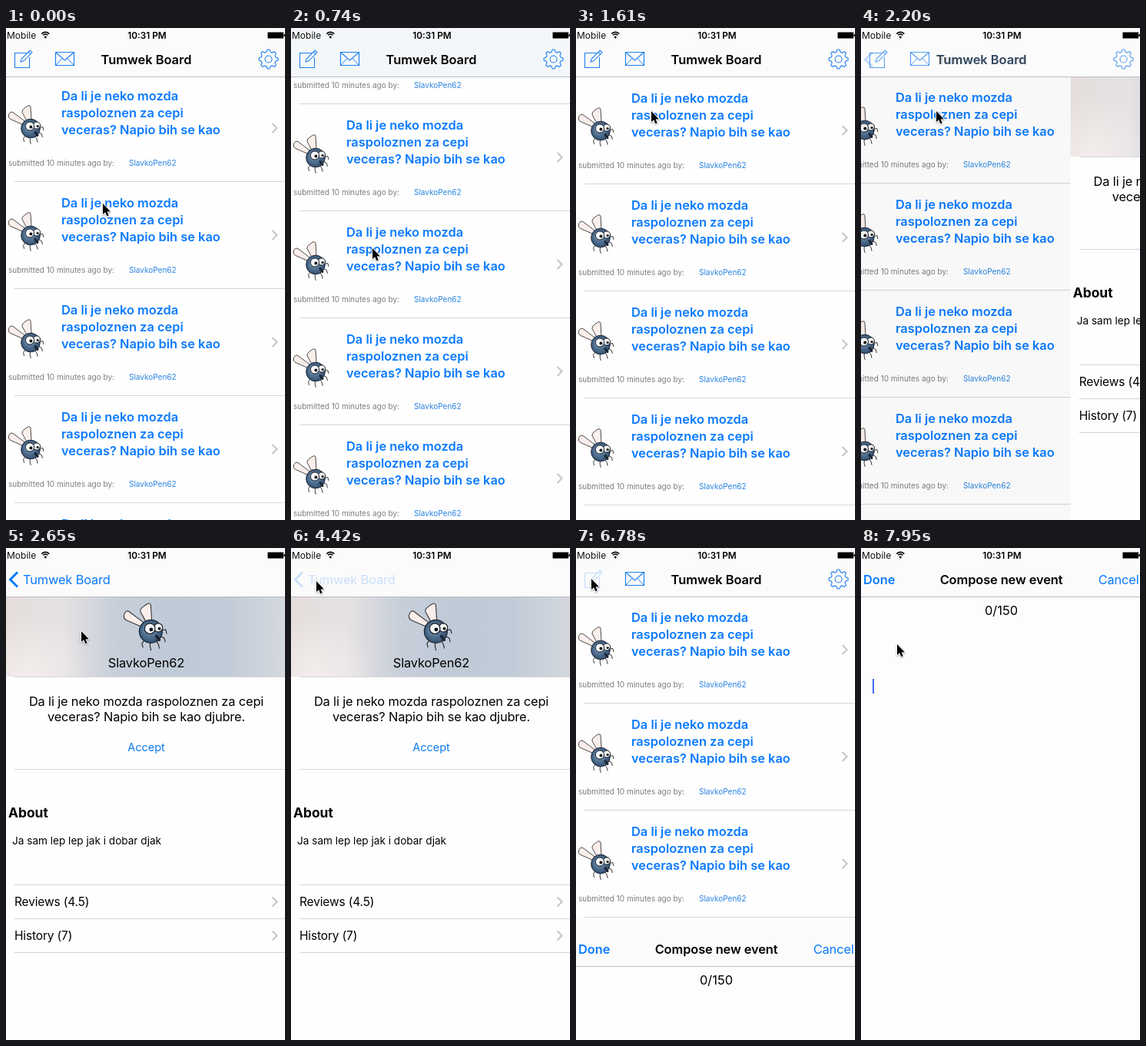
An HTML page with a canvas that plays this animation: 363x639 px, repeating every 8000 ms.

```html
<!DOCTYPE html>
<html lang="en">
<head>
<meta charset="utf-8">
<title>Board app</title>
<style>
  html, body { margin: 0; width: 100%; height: 100%; overflow: hidden; background: #fefefe; }
  canvas { display: block; width: 363px; height: 639px; }
</style>
</head>
<body>
<canvas id="stage"></canvas>
<script>
const W = 363, H = 639, MID = 182.5, LOOP = 8000, STEP = 147.2;
const NAV = 63.5, ROW = 139;
const BLUE = '#0a7aff', ICON = '#2080f0', PAPER = '#fefefe';
const APP = 'Tumwek Board', USER = 'SlavkoPen62';

const canvas = document.getElementById('stage');
const ctx = canvas.getContext('2d');
const dpr = window.devicePixelRatio || 1;
canvas.width = W * dpr;
canvas.height = H * dpr;

const clamp = u => Math.max(0, Math.min(1, u));
const smooth = u => u * u * (3 - 2 * u);
const easeOut = u => 1 - (1 - clamp(u)) ** 3;

// Pointer moves between rests, timed in screen steps
const MOVES = [
  { from: 0, to: 5, x: 106, y: 286 },
  { from: 5, to: 10, x: 98, y: 108 },
  { from: 21, to: 25, x: 62, y: 345 },
  { from: 25, to: 29, x: 33, y: 43 },
  { from: 31, to: 34, x: 36, y: 88 },
  { from: 34, to: 37, x: 33, y: 80 },
  { from: 38, to: 44, x: 20, y: 40 },
  { from: 46, to: 50, x: 47, y: 125 }
];

function pointerAt(n) {
  let x = 126, y = 228;
  for (const m of MOVES) {
    const u = smooth(clamp((n - m.from) / (m.to - m.from)));
    x += (m.x - x) * u;
    y += (m.y - y) * u;
  }
  return [x, y];
}

// A flick up and back past the top, then a decaying bounce
function scrollAt(n) {
  return n <= 8
    ? 119 * Math.sin(Math.PI * n / 8) - 1.75 * n
    : -2 - 12 * Math.exp(-(n - 8) * 0.7);
}

function text(s, x, y, size = 16.4, opt = {}) {
  const { weight = 400, color = '#000', align = 'left', spacing = 0 } = opt;
  ctx.font = `${weight} ${size}px Inter, "Liberation Sans", sans-serif`;
  ctx.letterSpacing = spacing + 'px';
  ctx.textAlign = align;
  ctx.fillStyle = color;
  ctx.fillText(s, x, y);
}

const body = (s, x, y, opt) => text(s, x, y, 16.4, { spacing: -0.15, ...opt });
const strong = (s, x, y, opt) => text(s, x, y, 16.4, { weight: 600, ...opt });

function stroke(path, color, width = 1) {
  ctx.strokeStyle = color;
  ctx.lineWidth = width;
  ctx.stroke(new Path2D(path));
}

function disc(x, y, r, fill, edge, width = 1) {
  ctx.beginPath();
  ctx.arc(x, y, r, 0, Math.PI * 2);
  if (fill) { ctx.fillStyle = fill; ctx.fill(); }
  if (edge) { ctx.strokeStyle = edge; ctx.lineWidth = width; ctx.stroke(); }
}

function rect(x, y, w, h, color) {
  ctx.fillStyle = color;
  ctx.fillRect(x, y, w, h);
}

// Draws in a moved, faded or scaled layer
function layer(x, y, alpha, draw, scale = 1) {
  ctx.save();
  ctx.translate(x, y);
  ctx.scale(scale, scale);
  ctx.globalAlpha *= alpha;
  draw();
  ctx.restore();
}

const rule = y => stroke(`M11 ${y}H${W}`, '#d6d6d8');
const chevron = y => stroke(`M346.5 ${y - 6}l6 6l-6 6`, '#c5c5ca', 2);

function wing(path) {
  ctx.fillStyle = '#faeeeb';
  ctx.fill(new Path2D(path));
  stroke(path, '#3a3636', 0.9);
}

function eye(x, y, r) {
  disc(x, y, r, '#f4f6f8', '#1a1f28');
  disc(x + r / 4, y + 1, r * 0.35, '#111');
}

function fly(x, y, scale) {
  layer(x, y, 1, () => {
    ctx.lineJoin = ctx.lineCap = 'round';
    wing('M22 22L6 10Q3 8 1 12Q-1 17 3 19L19 26Z');
    wing('M24 21L18 10Q17 7 22 4Q28 -1 29 3L30 19Z');
    for (let i = 0; i < 5; i++) {
      const a = 2.2 - i * 0.58;
      const at = r => `${29 + r * Math.cos(a)} ${31 + r * Math.sin(a)}`;
      stroke(`M${at(11)}L${at(16)}l1 4`, '#222', 0.9);
    }
    const skin = ctx.createRadialGradient(26, 28, 2, 29, 31, 13);
    skin.addColorStop(0, '#7395b6');
    skin.addColorStop(1, '#304c6c');
    disc(29, 31, 12.3, skin, '#1c2736');
    eye(37, 27, 4.6);
    eye(28, 28, 5.6);
    stroke('M35 36l3 4', '#1e2733', 3);
  }, scale);
}

function row(y) {
  fly(3, y + 35.5, 1);
  ['Da li je neko mozda', 'raspoloznen za cepi', 'veceras? Napio bih se kao']
    .forEach((s, i) => strong(s, 72, y + 30 + 22 * i, { color: BLUE }));
  chevron(y + 66);
  text('submitted 10 minutes ago by:', 3, y + 114.5, 10, { color: '#7d7d7d' });
  text(USER, 160, y + 114.5, 10, { color: '#2b84e0' });
  rule(y + 135.5);
}

function list(scroll) {
  rect(0, NAV, W, H, PAPER);
  for (let y = Math.round(64 - scroll); y < H; y += ROW) row(y);
}

// Soft photo backdrop: warm on the left, cool on the right
function cover() {
  const g = ctx.createLinearGradient(0, 0, W, 0);
  ['#e4dddc', '#e6e2e3', '#c6ced9', '#bfcad7', '#c2ccd8', '#d4d8de']
    .forEach((c, i) => g.addColorStop(i / 5, c));
  rect(0, 64, W, 103, g);
  const glow = ctx.createRadialGradient(30, 167, 0, 30, 167, 80);
  glow.addColorStop(0, 'rgba(247,241,240,.8)');
  glow.addColorStop(1, 'rgba(247,241,240,0)');
  rect(0, 64, W, 103, glow);
}

function profile() {
  const mid = { align: 'center' };
  rect(0, NAV, W, H, PAPER);
  cover();
  fly(153, 70.5, 1.22);
  body(USER, MID, 155, mid);
  body('Da li je neko mozda raspoloznen za cepi', MID, 205, mid);
  body('veceras? Napio bih se kao djubre.', MID, 225, mid);
  text('Accept', MID, 263.5, 14.5, { align: 'center', color: '#0f7bec' });
  text('About', 3, 350, 17.4, { weight: 700 });
  text('Ja sam lep lep jak i dobar djak', 8, 384.5, 13.6);
  rule(167.5);
  rule(287.5);
  rule(437.5);
  ['Reviews (4.5)', 'History (7)'].forEach((s, i) => {
    const y = 459.5 + 44 * i;
    text(s, 11, y + 5.5, 15.5, { spacing: -0.15 });
    chevron(y);
    rule(y + 22);
  });
}

function composeIcon() {
  stroke('M27 32.5H11.5V51.5H30.5V38', ICON, 1.1);
  stroke('M19 44l1.2 -4l11 -11l2.8 2.8l-11 11zM29 31l2.8 2.8', ICON, 1.1);
}

function mailIcon() {
  stroke('M64.5 31.5h24v17h-24zl12 10.5l12 -10.5', ICON, 1.2);
  stroke('M64.5 48.5l8.5 -9M88.5 48.5l-8.5 -9', ICON);
}

function gearIcon() {
  const teeth = 8;
  ctx.beginPath();
  for (let i = 0; i < teeth * 4; i++) {
    const a = (Math.floor(i / 2) + (i % 2 ? 0.28 : -0.28)) * Math.PI / teeth;
    const r = i % 4 < 2 ? 12.6 : 9.6;
    ctx.lineTo(341.5 + r * Math.cos(a), 40.5 + r * Math.sin(a));
  }
  ctx.closePath();
  ctx.strokeStyle = ICON;
  ctx.lineWidth = 1.1;
  ctx.stroke();
  disc(341.5, 40.5, 4.5, null, ICON, 1.1);
}

function bar(color = '#fbfbfb') {
  rect(0, 0, W, NAV, color);
  stroke(`M0 ${NAV}H${W}`, '#bcbcbe');
}

// p: 0 shows the list bar, 1 shows the profile bar
function navBar(p, scroll, backDim, iconDim) {
  bar(scroll > 5 ? '#f4f7fa' : undefined);
  layer(0, 0, 1 - p, () => {
    layer(0, 0, iconDim ? 0.25 : 1, composeIcon);
    mailIcon();
    gearIcon();
    strong(APP, MID - 104 * p, 47, { align: 'center' });
  });
  layer(0, 0, p * (backDim ? 0.2 : 1), () => {
    stroke('M15 31.5l-9.5 9.5l9.5 9.5', BLUE, 3);
    body(APP, 22 + 104 * (1 - p), 47, { color: BLUE });
  });
}

function composer(n) {
  rect(0, 0, W, H, '#fdfdfd');
  bar();
  strong('Done', 3, 47, { color: BLUE });
  strong('Compose new event', MID, 47, { align: 'center', spacing: -0.1 });
  body('Cancel', 361.5, 47, { color: BLUE, align: 'right' });
  text('0/150', MID, 87, 16.4, { align: 'center' });
  if (n < 51 || n > 53) rect(15, 170, 2, 19, '#426bf2');
}

function statusBar() {
  text('Mobile', 1, 13.8, 12, { color: '#111' });
  for (const r of [4, 6.6]) {
    ctx.beginPath();
    ctx.arc(51.3, 12, r, -Math.PI * 0.77, -Math.PI * 0.23);
    ctx.strokeStyle = '#000';
    ctx.lineWidth = 1.6;
    ctx.stroke();
  }
  disc(51.3, 12, 1.4, '#000');
  text('10:31 PM', 183.5, 13.8, 11.8, { weight: 600, align: 'center' });
  rect(340.5, 5.5, 20.5, 8, '#000');
  rect(361.5, 8, 1.5, 3, '#000');
}

function pointer(x, y) {
  const arrow = 'M0 0V14l3.2 -2.8l2.2 5l2.3 -1l-2.1 -4.8l4.2 -.2z';
  layer(x, y, 1, () => {
    ctx.lineJoin = 'round';
    ctx.shadowColor = 'rgba(0,0,0,.35)';
    ctx.shadowBlur = 2 * dpr;
    ctx.shadowOffsetY = dpr;
    stroke(arrow, '#fff', 1.8);
    ctx.shadowColor = 'transparent';
    ctx.fillStyle = '#000';
    ctx.fill(new Path2D(arrow));
  });
}

function pages(p, scroll) {
  if (p < 1) {
    layer(-0.3 * W * p, 0, 1, () => list(scroll));
    rect(0, NAV, W, H, `rgba(0,0,0,${0.1 * p})`);
  }
  if (p > 0) layer(W * (1 - p), 0, 1, profile);
}

function draw(t) {
  // The screen updates in even steps
  const n = Math.floor(t / STEP + 0.1);
  const scroll = scrollAt(n);
  const push = easeOut((n - 14.7) / 3.3) - easeOut((n - 30) / 4);
  const sheet = easeOut((n - 45.6) / 4.4);

  ctx.setTransform(dpr, 0, 0, dpr, 0, 0);
  rect(0, 0, W, H, PAPER);
  pages(push, scroll);
  navBar(push, scroll, n === 30, n >= 44);
  if (sheet > 0) layer(0, H * (1 - sheet), 1, () => composer(n));
  statusBar();
  pointer(...pointerAt(n));
}

const start = performance.now();
function tick() {
  draw((performance.now() - start) % LOOP);
  requestAnimationFrame(tick);
}
tick();
</script>
</body>
</html>
```
